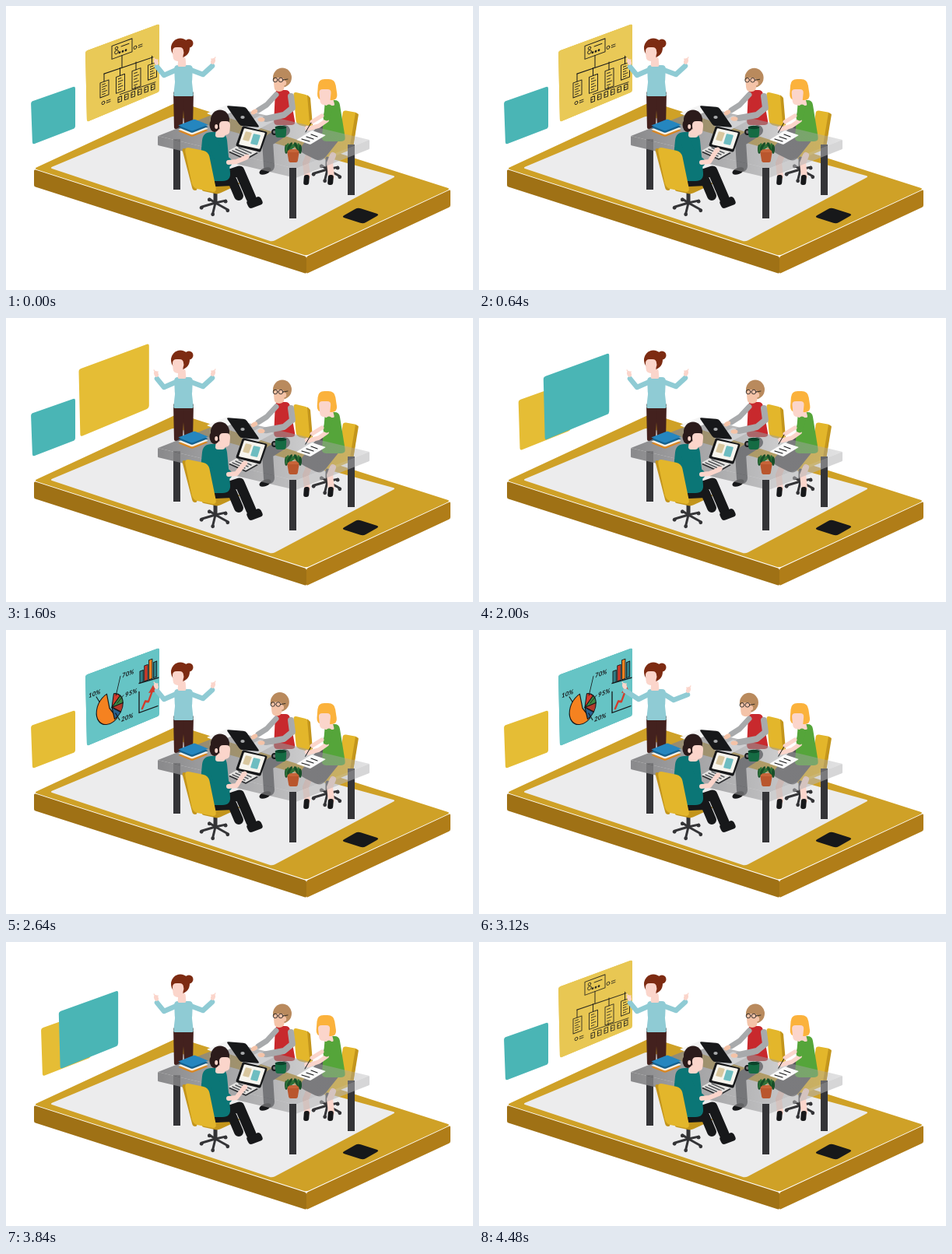
Recreate the animation shown at these times as an HTML page with a canvas. Size 600 by 365 pixels, loop 4.56 s.

```html
<!DOCTYPE html>
<html>
<head>
<meta charset="utf-8">
<style>
html, body { margin: 0; width: 100%; height: 100%; overflow: hidden; background: #fff; }
canvas { display: block; }
</style>
</head>
<body>
<canvas id="stage" width="600" height="365"></canvas>
<script>
const ctx = document.getElementById('stage').getContext('2d');
const LOOP = 4560, STEP = 80, TAU = Math.PI * 2;
const SKIN = '#fbd5cb', DARK = '#343437', INK = '#17181a', GOLD = '#e3b62b', GOLD2 = '#c3951c';
const YELLOW = '#e5bd35', TEAL = '#4ab5b5', BLUE = '#8fcbd4', GRAY = '#a8aaac';
const SHIRT = '#0b7676', GREEN = '#55a53a', BROWN = '#7d2b12', BLACK_HAIR = '#2b1b1b', RED = '#d23c2c';

const clamp = v => Math.max(0, Math.min(1, v));
const ramp = (t, a, b) => clamp((t - a) / (b - a));
const mix = (a, b, k) => a + (b - a) * k;
const ease = v => v * v * (3 - 2 * v);
const bump = (t, a, b, r) => ease(Math.min(ramp(t, a, a + r), ramp(t, b, b - r)));

// closed shape with softened corners
function shape(fill, p, r = 0) {
  const toward = (a, b) => {
    const k = Math.min(r / (Math.hypot(b[0] - a[0], b[1] - a[1]) || 1), 0.5);
    return [mix(a[0], b[0], k), mix(a[1], b[1], k)];
  };
  ctx.beginPath();
  p.forEach((c, i) => {
    ctx.lineTo(...toward(c, p.at(i - 1)));
    ctx.quadraticCurveTo(...c, ...toward(c, p[(i + 1) % p.length]));
  });
  ctx.closePath();
  ctx.fillStyle = fill;
  ctx.fill();
}

// parallelogram from a corner and two edges
const quad = (fill, x, y, [ax, ay], [bx, by], r = 1) =>
  shape(fill, [[x, y], [x + ax, y + ay], [x + ax + bx, y + ay + by], [x + bx, y + by]], r);

// trapezoid between two level edges given by centre and width
const taper = (fill, x, y, w, x2, y2, w2, r = 2) =>
  shape(fill, [[x - w / 2, y], [x + w / 2, y], [x2 + w2 / 2, y2], [x2 - w2 / 2, y2]], r);

function line(color, w, ...p) {
  ctx.beginPath();
  for (const q of p) ctx.lineTo(...q);
  ctx.strokeStyle = color;
  ctx.lineWidth = w;
  ctx.lineCap = ctx.lineJoin = 'round';
  ctx.stroke();
}

function oval(fill, x, y, rx, ry = rx, a = 0) {
  ctx.beginPath();
  ctx.ellipse(x, y, rx, ry, a, 0, TAU);
  ctx.fillStyle = fill;
  ctx.fill();
}

function ring(x, y, r, w = 0.8) {
  ctx.beginPath();
  ctx.arc(x, y, r, 0, TAU);
  ctx.strokeStyle = INK;
  ctx.lineWidth = w;
  ctx.stroke();
}

function tablet() {
  const edge = [350, 112], side = [185, -86], down = [0, 22];
  quad('#9f7115', 36, 210, edge, down, 2);
  quad('#b07d18', 386, 322, side, down, 2);
  quad('#cfa127', 36, 209, edge, side, 4);
  shape('#ececed', [[56, 208], [216, 141], [501, 219], [342, 303]], 4);
  quad(INK, 431, 271, [28, 9], [21, -12], 4);
}

// both panels share one shape that shrinks towards the lower left
const BIG = [[102, 58], [197, 23], [197, 110], [104, 149]];
const SMALL = [[32, 123], [89, 103], [89, 157], [34, 178]];
const panel = (color, k) =>
  shape(color, SMALL.map((p, i) => [mix(p[0], BIG[i][0], k), mix(p[1], BIG[i][1], k)]), 3);

function onBoard(alpha, tint, draw) {
  if (alpha <= 0) return;
  ctx.save();
  ctx.globalAlpha = alpha;
  panel(tint, 1);
  ctx.transform(1, -0.37, 0, 1, 102, 58);
  draw();
  ctx.restore();
}

function box(x, y, w, h, rows = 0) {
  ctx.strokeStyle = INK;
  ctx.lineWidth = 0.9;
  ctx.strokeRect(x, y, w, h);
  for (let i = 1; i <= rows; i++) {
    const yy = y + h * i / (rows + 1);
    line(INK, 0.8, [x + 2.5, yy], [x + w - 2.5 - i % 2 * 2, yy]);
  }
}

function orgChart() {
  box(34, 6, 26, 17);
  ring(40, 11, 1.8);
  ring(40, 16, 2.4);
  line(INK, 0.9, [46, 11], [56, 11]);
  for (let i = 0; i < 3; i++) oval(INK, 44 + i * 4, 18, 1.4);
  for (const [x, y] of [[64, 19], [23, 75]]) {
    ring(x, y, 2);
    for (const d of [-1, 1.5]) line(INK, 0.8, [x + 4, y + d], [x + 9, y + d]);
  }
  line(INK, 1, [47, 23], [47, 38]);
  line(INK, 1, [24, 38], [87, 40]);
  for (let i = 0; i < 4; i++) {
    const x = 24 + i * 20.5, h = 19 + i % 3 * 2;
    line(INK, 1, [x, 38], [x, 48]);
    box(x - 5, 48, 11, h, 5);
  }
  line(INK, 0.8, [64, 69], [64, 73]);
  line(INK, 0.8, [44, 72], [90, 73]);
  for (let i = 0; i < 6; i++) box(42 + i * 8.5, 75, 4.5, 6.5, 1);
}

function slice(color, x, r, a, b) {
  ctx.beginPath();
  ctx.moveTo(x, 54);
  ctx.ellipse(x, 54, r * 0.84, r, 0, a, b);
  ctx.closePath();
  ctx.fillStyle = color;
  ctx.fill();
  ctx.strokeStyle = INK;
  ctx.lineWidth = 1.1;
  ctx.stroke();
}

function charts() {
  slice('#f58220', 31, 20, 0.95, 4.5);
  [RED, '#3b8b46', '#b33a2c', '#28618f'].forEach((c, i) =>
    slice(c, 34, 17, -1.4 + i * 0.68, -0.72 + i * 0.68));
  ctx.font = 'italic bold 8px Lato, sans-serif';
  const labels = [['10%', 4, 31], ['70%', 47, 21], ['95%', 51, 47], ['20%', 46, 77]];
  for (const [text, x, y] of labels) {
    ctx.fillStyle = INK;
    ctx.fillText(text, x, y);
    const k = x < 30 ? 0.45 : 0.6;
    line(INK, 0.9, [mix(x + 3, 32, k), mix(y, 54, k)], [x < 30 ? x + 10 : x - 2, x < 30 ? y + 2 : y - 3]);
  }
  line(INK, 1.3, [69, 36], [94, 38]);
  ['#2f7f86', RED, '#f58220', '#2f7f86'].forEach((c, i) => {
    const h = 25 - 5 * Math.abs(i - 2), x = 70 + i * 5.8;
    ctx.fillStyle = c;
    ctx.fillRect(x, 36 - h, 4.3, h);
    box(x, 36 - h, 4.3, h);
  });
  line(INK, 1.3, [69, 47], [69, 74], [93, 74]);
  line(RED, 2.6, [73, 70], [77, 62], [81, 64], [86, 52]);
  shape(RED, [[81, 53], [87, 45], [91, 55]]);
}

function boards(t) {
  const second = t >= LOOP / 2 + 600;
  const p = ramp(t, second ? 3520 : 1520, second ? 4200 : 2200);
  const leave = () => panel(second ? TEAL : YELLOW, 1 - clamp(p * 1.04));
  const enter = () => panel(second ? YELLOW : TEAL, ease(ramp(p, 0.3, 0.92)));
  (p < 0.55 ? [enter, leave] : [leave, enter]).forEach(draw => draw());
  onBoard(Math.max(ramp(t, 1520, 1360), ramp(t, 4200, 4520)), '#e9c957', orgChart);
  onBoard(Math.min(ramp(t, 2240, 2560), ramp(t, 3520, 3360)), '#66c4c5', charts);
}

// hair first, then the face set into it
function head(x, y, hair, dx, dy, skin = SKIN) {
  oval(hair, x, y, 12, 12.5);
  taper(skin, x + dx, y + dy - 9, 15, x + dx, y + dy + 9, 12, 6);
  oval(skin, x - dx * 0.8, y + dy - 2, 2, 3);
}

function hand(x, y, lean) {
  oval(SKIN, x, y, 2.8, 4, lean);
  line(SKIN, 1.5, [x - lean * 6, y - 3], [x, y], [x + lean * 8, y - 5]);
}

function presenter(point, drop) {
  for (const s of [-1, 1]) taper('#43211e', 228 + s * 6, 110, 14, 228 + s * 6.5, 158, 11);
  const lx = mix(193, 187, point), rx = mix(266, 269, drop), ry = mix(71, 77, drop);
  line(BLUE, 6.5, [219, 82], [mix(203, 205, point), 89], [lx + 1, 78]);
  line(BLUE, 6.5, [237, 82], [mix(253, 250, drop), mix(88, 90, drop)], [rx - 1, ry + 6]);
  hand(lx, 72, -0.35);
  hand(rx, ry, 0.35);
  taper(BLUE, 228, 76, 24, 228, 100, 22, 5);
  taper(BLUE, 228, 94, 21, 228, 116, 26);
  taper(SKIN, 226, 66, 9, 226, 78, 11);
  oval(BROWN, 235, 48, 5.5);
  head(224, 54, BROWN, -3, 8);
}

function wheels(x, y) {
  line(DARK, 5, [x, y - 14], [x, y]);
  for (let i = 0; i < 5; i++) {
    const a = 0.5 + i * TAU / 5, ex = x + 18 * Math.cos(a), ey = y + 4 + 10 * Math.sin(a);
    line(DARK, 3, [x, y], [ex, ey]);
    oval(DARK, ex, ey + 1, 2.4);
  }
}

function behindTable(write) {
  quad(GOLD, 369, 110, [20, 5], [4, 42], 5);
  quad(GOLD2, 387, 114, [4, 4], [3, 36]);
  line('#4a4c51', 14, [358, 160], [336, 174], [338, 206]);
  oval(INK, 333, 212, 8, 4, -0.4);
  taper('#c8292d', 355, 108, 18, 358, 153, 28, 5);

  quad(GOLD, 433, 134, [19, 3], [-6, 46], 4);
  quad(GOLD2, 449, 137, [4, 2], [-7, 42]);
  quad(GOLD, 398, 184, [12, 14], [37, -15], 4);
  wheels(413, 210);
  for (const x of [385, 416]) {
    line(SKIN, 8, [x + 4, 192], [x, 202], [x + 2, 219]);
    quad(INK, x - 2, 217, [7, 0], [-1, 13], 3);
  }
  quad('#57575a', 375, 186, [30, 15], [28, -35], 9);
  taper(GREEN, 419, 121, 18, 421, 174, 31, 6);
  const x = 412 - write * 1.5;
  taper(SKIN, x + 2, 116, 11, x + 4, 128, 13);
  taper('#fbb23c', x, 94, 21, x + 1, 121, 27, 8);
  taper(SKIN, x - 2, 107, 16, x - 2, 127, 12, 5);
}

function table() {
  const edge = [177, 42], side = [95, -37], thick = [0, 12];
  const leg = (x, y) => { ctx.fillStyle = DARK; ctx.fillRect(x, y, 9, 65); };
  leg(439, 178);
  leg(215, 171);
  const glass = ctx.createLinearGradient(200, 0, 462, 0);
  glass.addColorStop(0, 'rgba(128,128,130,.9)');
  glass.addColorStop(0.5, 'rgba(143,143,145,.62)');
  glass.addColorStop(1, 'rgba(175,175,177,.38)');
  quad(glass, 195, 167, edge, side);
  quad(glass, 195, 167, edge, thick);
  quad('rgba(180,180,182,.55)', 372, 209, side, thick);
  leg(364, 208);
  quad('#f4f4f4', 258, 138, [14, 6], [26, -11]);
}

function desk() {
  ['#d98724', '#f5f1e6', '#15618f', '#2586bf'].forEach((c, i) =>
    quad(c, 221, 161 - i * 2.5, [18, 7], [21, -8]));

  quad('#d0d1d3', 302, 154, [18, 7], [24, -13]);
  quad(INK, 283, 128, [18, 26], [25, 2], 3);
  oval(GRAY, 304, 143, 2.7, 2);

  quad('#fafafa', 373, 172, [18, 6], [20, -12]);
  for (let i = 0; i < 3; i++) line(INK, 1.2, [380 + i * 6, 171 - i * 3], [390 + i * 5, 174 - i * 3]);

  ring(345, 162, 3, 1.8);
  taper('#156b43', 353, 156, 15, 353, 169, 13, 3);
  oval('#0b432a', 353, 156, 7.5, 2.2);

  taper('#b9562d', 369, 186, 16, 369, 201, 11);
  taper('#c7653a', 369, 184, 18, 369, 188, 18, 1);
  for (let i = 0; i < 7; i++) {
    const a = Math.PI * (1 + i / 6);
    oval(i % 2 ? '#2d7137' : '#174e28', 369 + Math.cos(a) * 9, 184 + Math.sin(a) * 4, 6, 2, a * 0.5 + Math.PI / 2 * (i > 3));
  }
}

function oldMan(turn, type) {
  const skin = '#f4c3a8', x = 355 - 9 * turn, y = 92 + 1.5 * turn;
  line(GRAY, 7, [347, 114], [335, 127], [324, 134]);
  line(GRAY, 8, [366, 116], [368, 131], [357, 140], [334, 145 - type]);
  oval(skin, 319, 136 + type, 4.5, 2.8, -0.5);
  oval(skin, 328, 146 - type, 4.5, 2.8);
  head(x, y, '#b98a5d', -4, 9, skin);
  for (const d of [-9, -2]) ring(x + d, y + 3, 2.8);
  line(INK, 0.8, [x + 1, y + 3], [x + 7, y + 2]);
}

function writer(write) {
  const x = 388 - write, y = 157 + write;
  line(SKIN, 5.5, [412, 147], [402, 154], [x + 3, y]);
  line(GREEN, 9, [415, 131], [412, 143]);
  line(SKIN, 5, [406, 141], [393, 149]);
  oval(SKIN, x, y, 4, 3, 0.4);
  line(INK, 1, [x + 4, y - 7], [x - 3, y + 5]);
}

function laptop() {
  quad('#303134', 286, 188, [22, 10], [16, -9]);
  quad('#e5e4e2', 286, 186, [22, 10], [16, -9]);
  for (let i = 0; i < 3; i++) line('#55575a', 1.4, [291 + i * 4, 186 - i * 2], [307 + i * 4, 193 - i * 2]);
  quad(INK, 304, 154, [32, 8], [-9, 26], 2);
  quad('#f7f5ee', 306, 157, [27, 6], [-7, 21]);
  quad('#d9c79e', 308, 161, [8, 2], [-4, 11]);
  quad('#6ebdc1', 318, 164, [9, 2], [-4, 13]);
}

function frontMan(raise) {
  wheels(269, 253);
  quad(GOLD2, 250, 237, [22, 5], [30, -14], 4);
  line(INK, 12, [270, 226], [291, 225], [299, 244]);
  line(INK, 13, [270, 222], [300, 212], [315, 247]);
  quad(INK, 308, 251, [5, 10], [18, -7], 4);
  taper(SHIRT, 268, 162, 30, 268, 225, 42, 11);
  line(SHIRT, 13, [266, 176], [273, 193], [284, 201]);
  const x = mix(308, 305, raise), y = mix(195, 186, raise);
  line(SKIN, 6, [286, 201], [296, 200], [x, y]);
  oval(SKIN, x + 1, y - 1, 3.8, 3.2, -0.6);
  taper(SKIN, 277, 155, 13, 275, 169, 13, 4);
  oval(BLACK_HAIR, 268, 153, 6.5, 9);
  head(275, 146, BLACK_HAIR, 6, 11);
  quad(GOLD2, 226, 183, [6, 0], [14, 54], 3);
  quad(GOLD, 229, 181, [31, 6], [11, 53], 7);
}

function render(t) {
  ctx.clearRect(0, 0, 600, 365);
  const beat = t / LOOP * 9 * TAU;
  const raise = clamp(0.5 + 1.2 * Math.cos(beat - 0.37 * TAU));
  const write = t >= 1760 && t < 2320 ? 0 : 0.5 - 0.5 * Math.cos(beat);
  const point = bump(t, 1120, 1520, 160) + bump(t, 2960, 3360, 160);
  const drop = bump(t, 880, 1520, 240) + bump(t, 2880, 3360, 240);
  const turn = bump(t, 560, 1600, 320) + bump(t, 2480, 3440, 400);
  tablet();
  boards(t);
  presenter(point, drop);
  behindTable(write);
  table();
  desk();
  oldMan(turn, raise);
  writer(write);
  laptop();
  frontMan(raise);
}

let start;
function tick(now) {
  start ??= now;
  render(Math.floor((now - start) % LOOP / STEP) * STEP);
  requestAnimationFrame(tick);
}
render(0);
requestAnimationFrame(tick);
</script>
</body>
</html>
```
